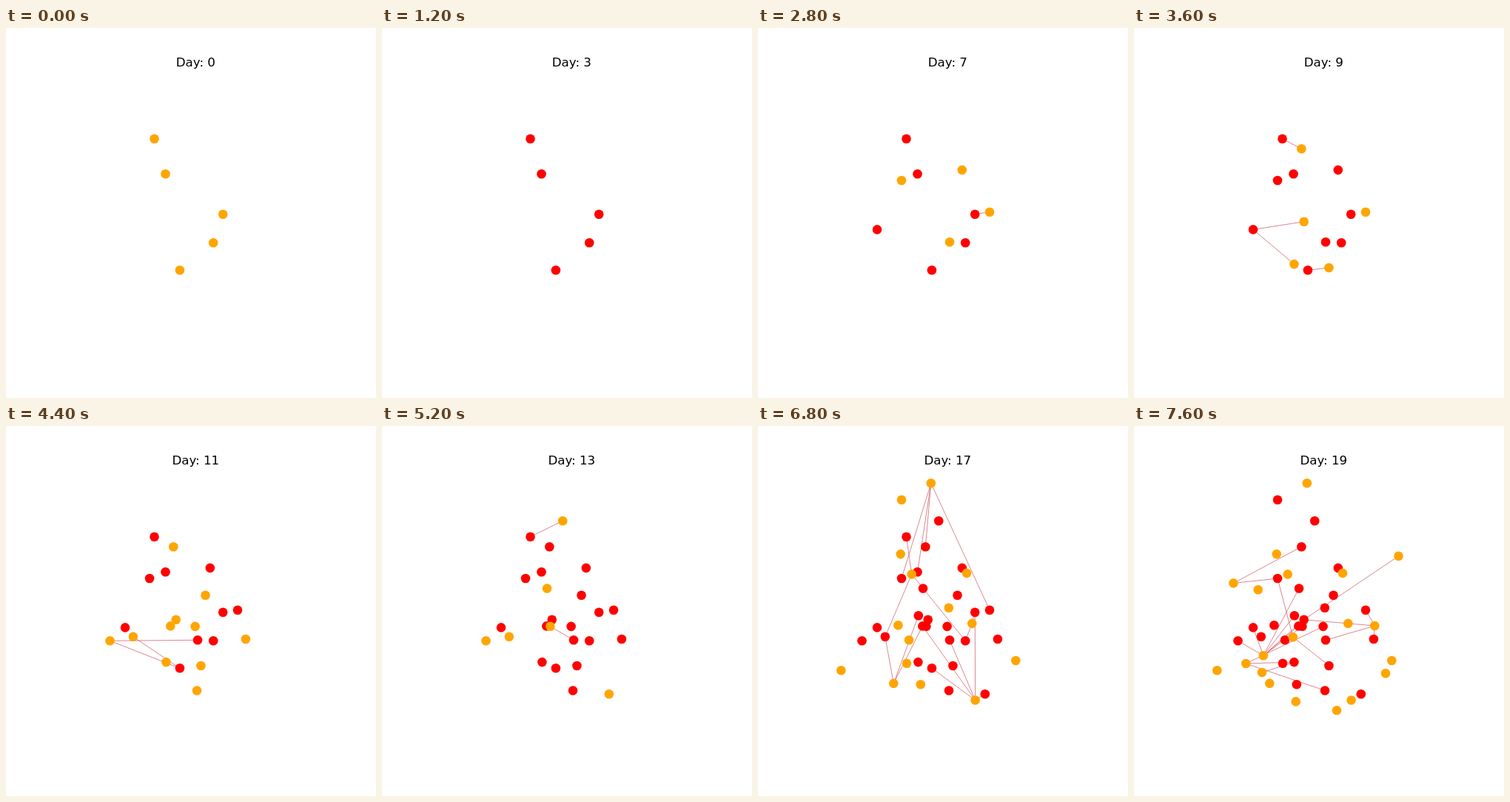
Write an HTML page that moves like this. It is 500 by 500 pixels and loops after 8000 ms.

```html
<!DOCTYPE html>
<html lang="en">
<head>
<meta charset="utf-8">
<title>Outbreak by day</title>
<style>
  html, body { margin: 0; width: 100%; height: 100%; overflow: hidden; background: #fff; }
  svg { display: block; width: 100%; height: 100%; }
  text { font: 16.67px "DejaVu Sans", sans-serif; text-anchor: middle; fill: #000; }
  line { stroke: #cb4a55; stroke-width: 0.8; stroke-opacity: 0.85; }
</style>
</head>
<body>
<svg viewBox="0 0 500 500">
  <g id="links"></g>
  <g id="dots"></g>
  <text id="title" x="256.3" y="52"></text>
</svg>
<script>
const DAY_MS = 400, DAYS = 20, RADIUS = 6.3, SICK_DAYS = 15;
const linkLayer = document.getElementById("links");
const dotLayer = document.getElementById("dots");
const title = document.getElementById("title");
const people = [];
const links = [];

function add(layer, tag, attrs) {
  const el = document.createElementNS("http://www.w3.org/2000/svg", tag);
  for (const key in attrs) el.setAttribute(key, attrs[key]);
  return layer.appendChild(el);
}

// A person turns up on a day, is ill after the incubation, and is linked to those who infected them.
function infect(day, incubation, x, y, ...sources) {
  const dot = add(dotLayer, "circle", { cx: x, cy: y, r: RADIUS });
  for (const id of sources) {
    const from = people[id];
    links.push({ day, el: add(linkLayer, "line", { x1: x, y1: y, x2: from.x, y2: from.y }) });
  }
  const ill = day + incubation;
  people.push({ x, y, day, ill, gone: ill + SICK_DAYS, dot });
}

infect(0, 3, 200.5, 149.7);
infect(0, 3, 215.5, 197.3);
infect(0, 3, 293.2, 251.7);
infect(0, 3, 280.2, 290.2);
infect(0, 3, 234.9, 327.3);

infect(4, 3, 161, 272.4, 1);
infect(5, 3, 194, 206, 1);
infect(6, 3, 275.8, 191.9, 2);
infect(6, 3, 259, 289.3, 3);
infect(7, 3, 313, 248.7, 2);

infect(9, 3, 226.3, 163.2, 0);
infect(9, 3, 229.7, 261.7, 5);
infect(9, 3, 216.4, 319.1, 5);
infect(9, 3, 263.4, 324, 4);

infect(10, 3, 269.5, 228.8, 7);
infect(10, 3, 222.3, 270.4, 5);
infect(10, 3, 255.6, 270.9, 8);
infect(10, 3, 258, 357.5, 4);
infect(10, 3, 323.9, 288, 9);

infect(11, 4, 140.5, 290.3, 8, 4);
infect(11, 3, 171.8, 284.8, 4);
infect(12, 3, 223, 219.5, 6);
infect(12, 3, 306.8, 362.3, 4);

infect(13, 3, 244.2, 128.3, 0);
infect(13, 3, 227.4, 270.8, 8);
infect(14, 3, 216.8, 256.2, 6);
infect(14, 4, 257.8, 245.7, 7);
infect(14, 4, 204, 289.2, 5);
infect(15, 3, 194, 99.7, 6, 7);
infect(15, 3, 189.4, 269.3, 5, 19, 20, 11, 15);

infect(16, 4, 192.7, 173.1, 0);
infect(16, 4, 282, 198.9, 7);
infect(16, 3, 201, 320.8, 12);
infect(16, 4, 112.3, 330.3, 19);
infect(16, 3, 219.8, 349.2, 17);
infect(16, 4, 348.3, 317, 18);

infect(17, 3, 233.8, 77.3, 10, 6, 1, 9);
infect(17, 3, 207.7, 200.4, 0, 20, 3);
infect(17, 3, 183.3, 347.9, 20, 25, 15);
infect(17, 3, 293.6, 370.5, 2, 15, 8, 4, 22);
infect(17, 3, 289.3, 266.9, 3, 2);

infect(18, 3, 167.7, 221.2, 5);
infect(18, 3, 340, 334.2, 22);
infect(18, 3, 218.7, 372.4, 17);
infect(18, 3, 274, 384.3, 22);

infect(19, 3, 134.4, 212.4, 10, 6);
infect(19, 3, 357.5, 175.8, 11);
infect(19, 3, 325.3, 270, 9, 18, 8, 11);
infect(19, 3, 214.8, 285.2, 6, 13);
infect(19, 3, 174.8, 310.3, 5, 19, 21, 25, 15, 24, 11);
infect(19, 3, 151.3, 321, 12, 17, 16);
infect(19, 3, 173, 333, 12);

function show(el, visible) {
  el.setAttribute("visibility", visible ? "visible" : "hidden");
}

function draw(day) {
  title.textContent = "Day: " + day;
  for (const p of people) {
    show(p.dot, day >= p.day && day < p.gone);
    p.dot.setAttribute("fill", day < p.ill ? "#ffa500" : "#ff0000");
  }
  for (const link of links) show(link.el, link.day === day);
}

let shown = -1;
const start = performance.now();

function tick() {
  const day = Math.floor((performance.now() - start) / DAY_MS) % DAYS;
  if (day !== shown) draw(shown = day);
  requestAnimationFrame(tick);
}
tick();
</script>
</body>
</html>
```
